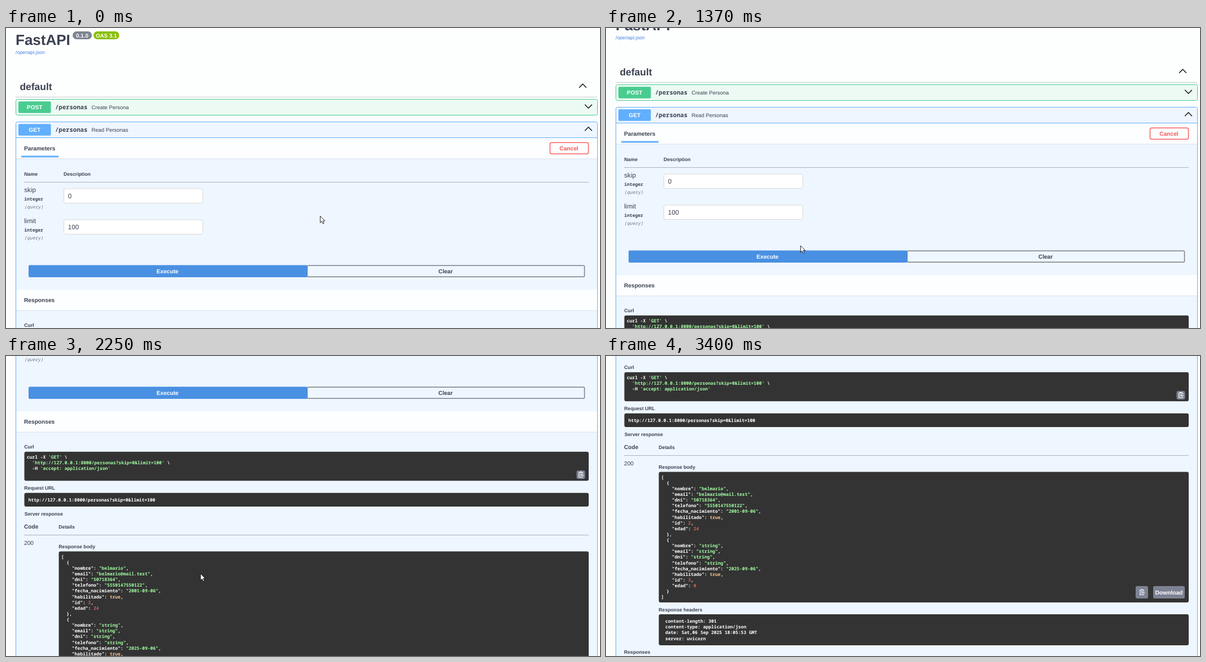
An HTML page for the animation above (3.95 s loop, 1052 by 532 pixels).

```html
<!DOCTYPE html>
<html lang="en">
<head>
<meta charset="utf-8">
<title>API docs</title>
<style>
  html, body { margin: 0; width: 100%; height: 100%; overflow: hidden; background: #fdfefe; }
  svg { display: block; }
  text { font-family: "Liberation Sans", Arial, sans-serif; fill: #3b4151; white-space: pre; text-rendering: geometricPrecision; }
  .b { font-weight: 700; }
  .m { font-family: "Noto Sans Mono", "DejaVu Sans Mono", monospace; }
  .i { font-style: italic; fill: #70757f; }
  .c { text-anchor: middle; }
  .w { fill: #fff; }
  .link { fill: #4680e4; }
  .red { fill: #f95454; }
  .str { fill: #a2fca2; }
  .num { fill: #d36363; }
  .lit { fill: #fcc28c; }
</style>
</head>
<body>
<svg id="stage" width="1052" height="532" viewBox="0 0 1052 532"></svg>
<script>
const LOOP = 3950;
const S = 8.7, M = 10.16, MONO = 7.975, LINE = 10.13;

const escape = s => s.replace(/&/g, '&amp;');
const text = (x, y, s, size, cls = '') =>
  `<text x="${x}" y="${y}" font-size="${size}" class="${cls}">${s}</text>`;
const box = (x1, y1, x2, y2, fill, r = 0, extra = '') =>
  `<rect x="${x1}" y="${y1}" width="${x2 - x1}" height="${y2 - y1}" rx="${r}" fill="${fill}" ${extra}/>`;
const rule = (y, x1, x2, color) => box(x1, y, x2, y + 1, color);
const dark = (x, y1, y2) => box(x, y1, 1032, y2, '#333', 3);
const chevron = (x, y, dir) =>
  `<path d="M${x - 6.3} ${y + 3.2 * dir}L${x} ${y - 3.2 * dir}L${x + 6.3} ${y + 3.2 * dir}" fill="none" stroke="#111" stroke-width="1.5"/>`;
const lines = (x, y, list) =>
  list.map((s, i) => text(x, y + i * LINE, s, MONO, 'm b w')).join('');

const span = (cls, s) => `<tspan class="${cls}">${s}</tspan>`;
const highlight = s => escape(s)
  .replace(/'[^']*'/g, q => span('str', q))
  .replace(/: ("[^"]*"|\d+|true)/, (_, v) =>
    ': ' + span(v[0] === '"' ? 'str' : v === 'true' ? 'lit' : 'num', v));

const copyButton = (x, y, size) => box(x, y, x + size, y + size, '#7d8293', 3) +
  `<g transform="translate(${x + size / 2 - 5} ${y + size / 2 - 5.5})" fill="none" stroke="#fff">
    <path d="M8.5 4V1.5H1.5V10H8.5V8.5M3.5 1.5V.5H6.5V1.5M3 4H7M3 6H4.5M3 8H4.5"/>
    <path d="M10.5 6.3H5.5M7.5 4.3L5.5 6.3L7.5 8.3"/></g>`;

const endpoint = (y, method, summary, color) =>
  box(22, y + 4, 79.5, y + 24.5, color, 2) +
  text(50.7, y + 18, method, M, 'b c w') +
  text(87, y + 18, '/personas', 10.64, 'm b') +
  text(151.5, y + 17.5, summary, 9.43);

const parameter = (y, name, value) =>
  text(32.3, y, name, 11.6) +
  text(32.3, y + 14.5, 'integer', MONO, 'm b') +
  text(32.3, y + 28.5, '(query)', MONO, 'm i') +
  box(102.5, y - 6, 348.5, y + 19.5, '#fff', 3, 'stroke="#d9d9d9"') +
  text(109.8, y + 10.5, value, 11.6);

const band = (y, title) =>
  box(18, y, 1047, y + 36.5, 'rgba(255,255,255,.85)') +
  rule(y + 36.5, 18, 1047, 'rgba(0,0,0,.08)') +
  text(32, y + 21.7, title, M, 'b');

const person = p => ['  {', ...Object.entries(p).map(([key, value], i, all) =>
  `    "${key}": ${JSON.stringify(value)}${i < all.length - 1 ? ',' : ''}`), '  }'];
const first = person({
  nombre: 'belmario', email: 'belmario@mail.test', dni: '50718364', telefono: '5550147550122',
  fecha_nacimiento: '2001-09-06', habilitado: true, id: 2, edad: 24
});
const second = person({
  nombre: 'string', email: 'string', dni: 'string', telefono: 'string',
  fecha_nacimiento: '2025-09-06', habilitado: true, id: 3, edad: 0
});
first[first.length - 1] += ',';
const body = ['[', ...first, ...second, ']'];
const curl = ["curl -X 'GET' \\", "  'http://127.0.0.1:8000/personas?skip=0&limit=100' \\", "  -H 'accept: application/json'"];
const headers = ['content-length: 301', 'content-type: application/json', 'date: Sat,06 Sep 2025 18:05:53 GMT', 'server: uvicorn'];

const intro =
  text(17, 29.5, 'FastAPI', 26, 'b') +
  box(118, 6, 152, 20, '#7d8492', 7) + text(135, 16.5, '0.1.0', 9.8, 'b c w') +
  box(155, 6, 200.5, 20, '#89bf04', 7) + text(177.7, 16.5, 'OAS 3.1', 9.8, 'b c w') +
  text(17, 46, '/openapi.json', S, 'link') +
  text(24.5, 109.5, 'default', 17.4, 'b') + chevron(1021.5, 102.5, 1) +
  rule(122, 17, 1047, '#c4c6ca') +
  box(17.5, 126.5, 1047.5, 154.5, '#edfaf4', 3, 'stroke="#49cc90"') +
  endpoint(126.3, 'POST', 'Create Persona', '#49cc90') + chevron(1031.5, 139, -1);

const request =
  box(17.5, 166.5, 1047.5, 1300, '#eef6ff', 3, 'stroke="#61affe"') +
  endpoint(166.3, 'GET', 'Read Personas', '#61affe') + chevron(1031.5, 179, 1) +
  rule(194, 18, 1047, '#61affe') +
  band(195, 'Parameters') + box(27, 226.5, 93, 229.5, '#61affe') +
  box(963.5, 203.2, 1031.5, 223.2, 'none', 3, 'stroke="#ff6060" stroke-width="1.5"') +
  text(997, 216.7, 'Cancel', M, 'b c red') +
  text(32.3, 262.2, 'Name', S, 'b') + text(102, 262.2, 'Description', S, 'b') +
  rule(273, 32, 1032, '#a9b3c0') +
  parameter(291, 'skip', '0') + parameter(346, 'limit', '100') +
  box(533.5, 421.2, 1024.5, 441.2, 'none', 2, 'stroke="#7c7f85" stroke-width="1.5"') +
  box(40, 420.5, 533.5, 442, '#4990e2', 2) +
  text(286, 435, 'Execute', M, 'b c w') + text(778.5, 435, 'Clear', M, 'b c');

const response =
  band(464, 'Responses') +
  text(32.3, 529.5, 'Curl', S, 'b') + dark(32.5, 535.7, 587.3) +
  lines(36.8, 547.7, curl.map(highlight)) + copyButton(1010.5, 569, 15) +
  text(32.3, 602.5, 'Request URL', S, 'b') + dark(32.5, 608.7, 633) +
  lines(39.7, 623.7, [escape('http://127.0.0.1:8000/personas?skip=0&limit=100')]) +
  text(32.7, 648.5, 'Server response', S, 'b') +
  text(32, 672.3, 'Code', M, 'b') + text(93.3, 671.7, 'Details', S, 'b') +
  rule(683, 32, 1032, '#a9b3c0') +
  text(32, 700.5, '200', M) +
  text(93.3, 706.5, 'Response body', S, 'b') + dark(93.5, 712.5, 944) +
  lines(97.7, 724.6, body.map(highlight)) +
  copyButton(938, 915, 22) + box(969, 915, 1025, 937, '#7d8293', 3) +
  text(997, 929.7, 'Download', M, 'b c w') +
  text(93.3, 959.5, 'Response headers', S, 'b') + dark(93.5, 965, 1020) +
  lines(105, 980.2, headers) +
  text(32, 1035, 'Responses', S, 'b');

const stage = document.getElementById('stage');
stage.innerHTML = `<g id="page">${intro}${request}<g id="response">${response}</g></g>
  <path id="cursor" d="M0 0V11.8L2.7 9.3L4.6 13.5L6.7 12.6L4.8 8.5H8.4Z" fill="#fff" stroke="#111" stroke-width=".9"/>`;
const [page, live, cursor] = ['page', 'response', 'cursor'].map(id => document.getElementById(id));
const place = (el, x, y) => el.setAttribute('transform', `translate(${x} ${y})`);

const step = (t, start, end, n) => t < start ? 0 :
  Math.min(n, 1 + Math.floor((t - start) / (end - start) * (n - 1) + .2));

const scrolls = [
  [1310, 1560, [0, 4, 26, 68, 110, 138, 145]],
  [1820, 2030, [145, 152, 195, 249, 322, 362]],
  [2250, 2480, [362, 366, 404, 455, 494, 507]]
];
const scrollAt = t => {
  const [start, end, stops] = scrolls.findLast(s => t >= s[0]) || scrolls[0];
  return stops[step(t, start, end, stops.length - 1)];
};

const mix = (a, b, u) => a.map((v, i) => v + (b[i] - v) * u);
const REST = [556.5, 333.5], EXECUTE = [274, 431], IDLE = [344.5, 386], OUT = [1024, 545];
const cursorAt = t => {
  if (t < 630) return mix(REST, EXECUTE, 1 - (1 - step(t, 60, 450, 8) / 8) ** 2);
  if (t < 3090) return mix(EXECUTE, IDLE, Math.max(0, step(t, 630, 940, 5) - 2) / 3);
  return mix(IDLE, OUT, (step(t, 3090, 3400, 7) / 7) ** 1.3);
};

function draw(t) {
  place(page, 0, -scrollAt(t));
  // The loading gap pushes the response down for a moment after the click.
  place(live, 0, step(t, 630, 940, 5) === 1 ? 73 : 0);
  place(cursor, ...cursorAt(t));
}

const origin = performance.now();
function tick() {
  draw((performance.now() - origin) % LOOP);
  requestAnimationFrame(tick);
}
tick();
</script>
</body>
</html>
```
